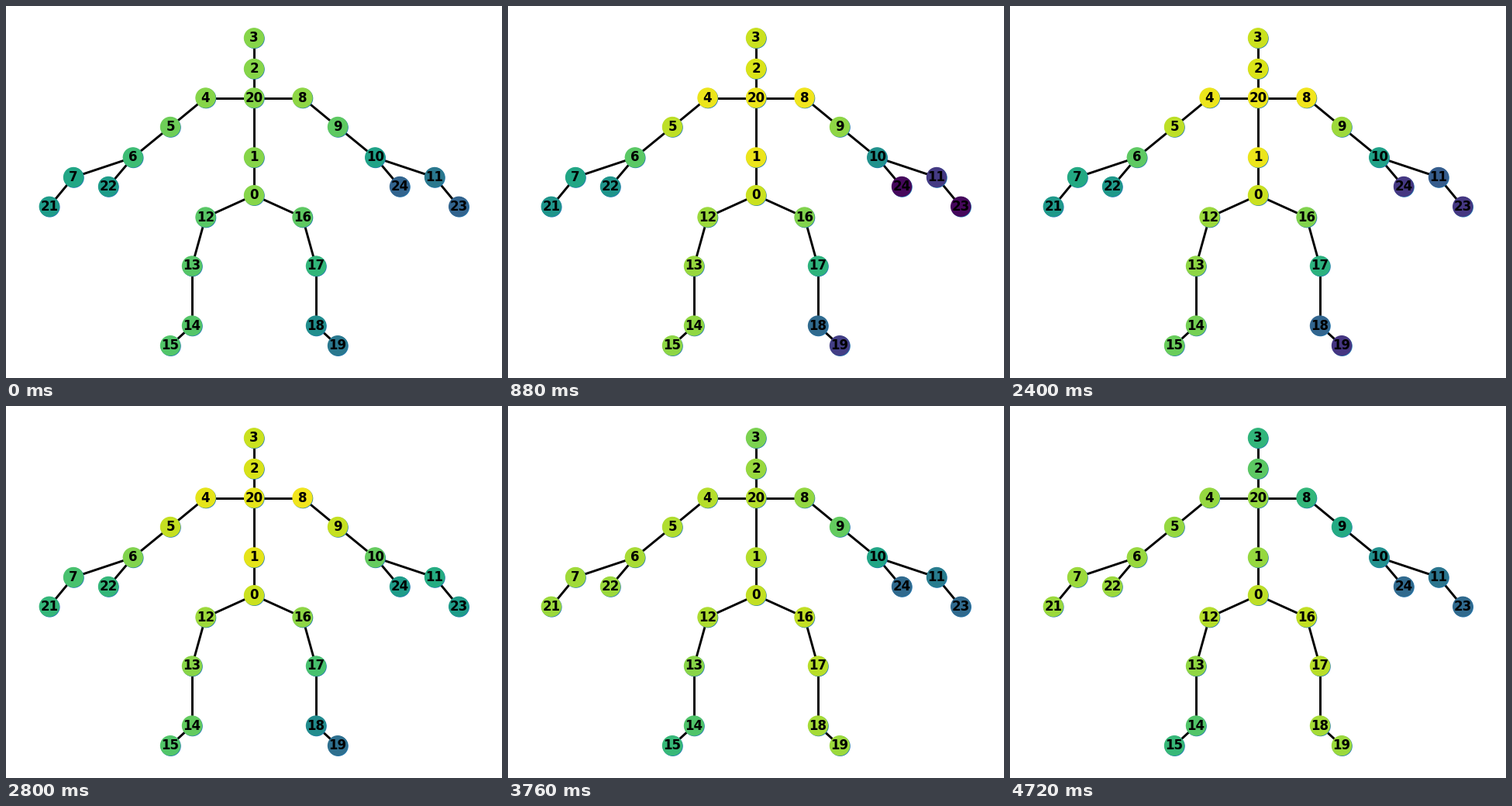
Animation of 640x480 px, one loop 4800 ms. Source, as a matplotlib script:

```python
import matplotlib.pyplot as plt
import numpy as np
from matplotlib.animation import FuncAnimation
from matplotlib.collections import LineCollection

W, H, DPI = 640, 480, 100
FRAMES, STEP = 60, 80
CENTER = W / 2

# Joint positions: the spine, then one side as (distance from centre, y).
SPINE = {3: 41.3, 2: 81, 20: 118.5, 1: 195.4, 0: 244.2}
SIDE = {4: (62.5, 118.5), 5: (108, 156), 6: (156.2, 195.4), 7: (233, 221),
        21: (264.2, 258.8), 22: (188, 233),
        12: (62.5, 272.5), 13: (80, 335.5), 14: (80, 412.5), 15: (108, 438.2)}
ARM, LEG = (4, 5, 6, 7, 21), (12, 13, 14, 15)


def mirror(joint):
    """Number of the matching joint on the other side of the body."""
    if joint in SPINE:
        return joint
    return joint + (2 if joint > 20 else 4)


def pairs(chain):
    return list(zip(chain, chain[1:]))


def build_skeleton():
    pos = {j: (CENTER, y) for j, y in SPINE.items()}
    for j, (dx, y) in SIDE.items():
        pos[j] = (CENTER - dx, y)
        pos[mirror(j)] = (CENTER + dx, y)
    side = pairs((20,) + ARM) + [(6, 22)] + pairs((0,) + LEG)
    bones = pairs(tuple(SPINE)) + side
    bones += [(mirror(a), mirror(b)) for a, b in side]
    return pos, bones


def ramp(x, start=0, end=1):
    """Smooth step from 0 to 1 between start and end."""
    u = np.clip((x - start) / (end - start), 0, 1)
    return u * u * (3 - 2 * u)


def spread(chain, root, tip):
    """Blend the level smoothly along a chain of joints."""
    mix = ramp(np.linspace(0, 1, len(chain)))
    return dict(zip(chain, root + (tip - root) * mix))


def levels_at(t):
    """Activity of every joint in percent at t seconds."""
    wake, sink = ramp(t, 0, 0.32), ramp(t, 0.32, 1.44)
    recover = ramp(t, 1.44, 3.76)
    fade, slide = ramp(t, 2.4, 4.72), ramp(t, 2.8, 4.9)

    core = 82 + 15 * wake - 13 * fade
    head = 82 + 10 * wake - 27 * slide
    pelvis = 82 + 10 * wake - 2 * fade
    shoulder = 83 + 15 * wake - 33 * slide
    hand_a = 55 + 14 * wake - 34 * sink + 50 * recover
    hand_b = (32 - 30 * wake + 69 * ramp(t, 2.1, 3.12)
              - 37 * ramp(t, 3.12, 3.76))
    hip_a = 74 + 11 * wake + 4 * fade
    foot_a = 73 + 10 * wake - 16 * recover
    hip_b = 75 + 6 * wake + 10 * ramp(t, 2.4, 3.76)
    foot_b = 40 - 16 * wake - 12 * sink + 73 * ramp(t, 2.2, 3.76)

    return {
        **spread((20, 2, 3), core, head),
        **spread((1, 0), core, pelvis),
        **spread(ARM, core, hand_a), 22: hand_a,
        **spread([mirror(j) for j in ARM], shoulder, hand_b), 24: hand_b,
        **spread(LEG, hip_a, foot_a),
        **spread([mirror(j) for j in LEG], hip_b, foot_b),
    }


pos, bones = build_skeleton()
joints = sorted(pos)
points = np.array([pos[j] for j in joints])

fig = plt.figure(figsize=(W / DPI, H / DPI), dpi=DPI, facecolor="white")
ax = fig.add_axes([0, 0, 1, 1])
ax.set(xlim=(0, W), ylim=(H, 0))
ax.axis("off")

ax.add_collection(LineCollection([(pos[a], pos[b]) for a, b in bones],
                                 colors="black", linewidths=2.1, zorder=1))


def discs(xy, colors, zorder):
    return ax.scatter(*xy.T, s=360, c=colors, linewidths=0, zorder=zorder)


def colors_at(t):
    levels = levels_at(t)
    return plt.cm.viridis([levels[j] / 100 for j in joints])


# Blue discs peek out at the lower right of the coloured ones.
discs(points + 0.6, ["#1f78b4"] * len(joints), 2)
nodes = discs(points, colors_at(0), 3)

for j in joints:
    ax.text(*pos[j], str(j), size=12, weight="bold", family="DejaVu Sans",
            color="black", ha="center", va="center", zorder=4)


def update(i):
    nodes.set_facecolor(colors_at(i * STEP / 1000))
    return (nodes,)


anim = FuncAnimation(fig, update, frames=FRAMES, interval=STEP,
                     repeat=True, repeat_delay=0, blit=False)
plt.show()
```
